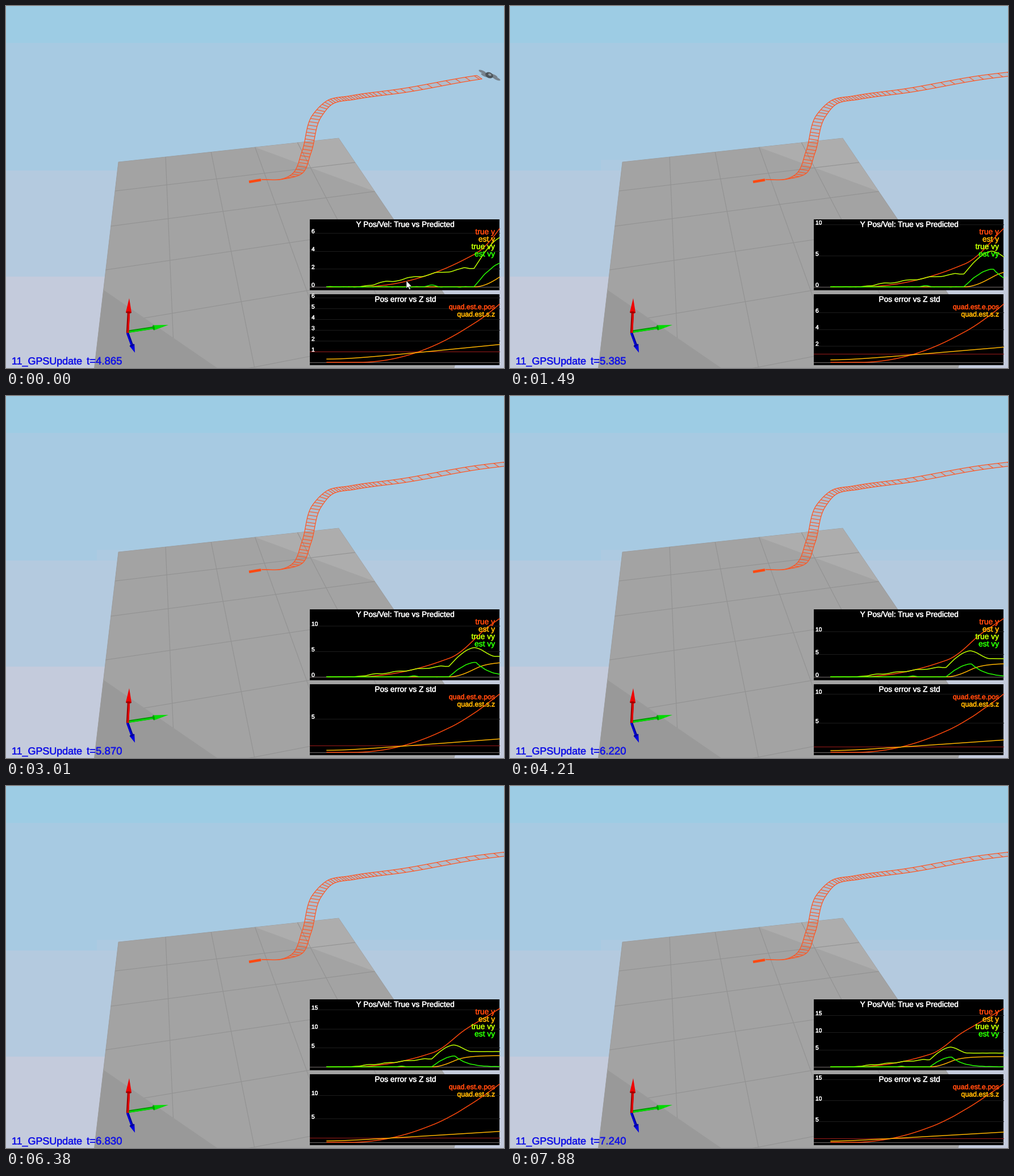
A matplotlib script that plays this animation: 877 px wide and 638 px high, repeating every 8 s.

```python
import numpy as np
import matplotlib.pyplot as plt
from matplotlib import patheffects
from matplotlib.animation import FuncAnimation
from matplotlib.collections import LineCollection
from matplotlib.patches import Ellipse, Polygon, Rectangle

W, H, DPI = 877, 638, 64
PX = 72 / DPI  # points per pixel
FRAMES, INTERVAL = 160, 50
STEPS = 59  # pictures in one loop

RED, GOLD = "#ff480c", "#ffb400"
LIME, GREEN = "#beff00", "#28ff00"
TRAIL, BLUE = "#ff5420", "#1414e6"

fig = plt.figure(figsize=(W / DPI, H / DPI), dpi=DPI)
ax = fig.add_axes([0, 0, 1, 1])
ax.set_xlim(0, W)
ax.set_ylim(H, 0)
ax.axis("off")


def ramp(x, a, b):
    return np.clip((x - a) / (b - a), 0, 1)


def smooth(x, a, b):
    s = ramp(x, a, b)
    return s * s * (3 - 2 * s)


def rect(x0, y0, x1, y1, color, z=0):
    return ax.add_patch(Rectangle((x0, y0), x1 - x0, y1 - y0, fc=color, lw=0, zorder=z))


def poly(points, color, z=1, **kw):
    return ax.add_patch(Polygon(points, closed=True, fc=color, zorder=z, **{"lw": 0, **kw}))


def line(xs, ys, color, width=1.0, z=2, **kw):
    return ax.plot(xs, ys, color=color, lw=width * PX, zorder=z, **kw)[0]


def segments(color, width, z, lines=()):
    return ax.add_collection(LineCollection(lines, colors=color, linewidths=width * PX, zorder=z))


def label(x, y, text, size, color="white", ha="left", z=12):
    bold = patheffects.withStroke(linewidth=0.45 * PX, foreground=color)
    return ax.text(x, y, text, fontsize=size * PX, color=color, ha=ha, va="baseline",
                   family="Liberation Sans", zorder=z, path_effects=[bold])


# ---------------------------------------------------------------- scene
def floor(u, v):
    """Perspective view of the 5 x 5 tiled floor."""
    depth = 1 + 0.018 * u - 0.0887 * v
    return (198 + 88.1 * u - 23 * v) / depth, (275 - 4.2 * u + 22.1 * v) / depth


def draw_scene():
    for top, color in zip((0, 65, 290, 477), ("#9dcce4", "#a7cae2", "#b4cadf", "#c4cbdc")):
        rect(0, top, W, H, color)
    poly([floor(0, 0), floor(5, 0), floor(5, 5), (789, H), floor(0, 4.61)], "#a3a3a3",
         ec="#9a9a9a", lw=0.8 * PX)
    poly([floor(3, 0), floor(5, 0), floor(5, 2)], "#adadad")
    for k in range(1, 6):
        segments("#929292", 1.1, 2, [[floor(0, k), floor(5, k)]])
        if k < 5:
            segments("#929292", 1.1, 2, [[floor(k, 0), floor(k, 5)]])
    poly([floor(0, 3.39), (372, H), floor(0, 4.61)], "#999999", 3)
    line([W - 0.5] * 2, [0, H], "#dfe6ea", 1, 20)


def arrow(base, neck, tip, color, dark, half=4.5):
    base, neck, tip = (np.array(p, float) for p in (base, neck, tip))
    d = (tip - neck) / np.hypot(*(tip - neck))
    n = np.array([-d[1], d[0]])
    line(*zip(base, neck), dark, 4.5, 5, solid_capstyle="butt")
    line(*zip(base + n, neck + n), color, 2.2, 5, solid_capstyle="butt")
    poly([neck + n * half, tip, neck - n * half], color, 6)
    ax.add_patch(Ellipse(neck, 3.5, 2 * half, angle=np.degrees(np.arctan2(d[1], d[0])),
                         fc=dark, lw=0, zorder=6))


draw_scene()
haze = rect(160, 271, W, 290, "#adcae1", 0.5)
arrow((214, 576), (222, 598), (227, 611), "#0000e0", "#00009c")
arrow((214, 574), (260, 567), (286, 562), "#00dc00", "#009a00")
arrow((214, 576), (216, 540), (217, 515), "#f00000", "#a00000", 5)


# ---------------------------------------------------------------- trail
def curve(points, n=600):
    """Smooth path through key points, evenly spaced along its chords."""
    p = np.array(points, float)
    s = np.append(0, np.cumsum(np.hypot(*np.diff(p, axis=0).T)))
    m = np.gradient(p, s, axis=0)
    q = np.linspace(0, s[-1], n)
    i = np.clip(np.searchsorted(s, q, side="right") - 1, 0, len(s) - 2)
    h = (s[i + 1] - s[i])[:, None]
    t = (q - s[i])[:, None] / h
    return ((1 + 2 * t) * (1 - t) ** 2 * p[i] + t * (1 - t) ** 2 * h * m[i]
            + t * t * (3 - 2 * t) * p[i + 1] + t * t * (t - 1) * h * m[i + 1])


PATH = curve([(450, 306), (487, 305), (513, 295), (529, 258), (548, 193), (570, 170),
              (610, 161.5), (700, 149), (834, 125.5), (905, 117)])


def half_width():
    x = PATH[:, :1]
    bend = smooth(x, 545, 575)
    side = (1 - bend) * np.array([8, 1.2]) + bend * np.array([4.6, 3.1])
    return side * (0.08 + 0.92 * smooth(x, 482, 522))


def rung_indices():
    """Rungs spread out as the flight gets faster."""
    length = np.append(0, np.cumsum(np.hypot(*np.diff(PATH, axis=0).T)))
    found, s = [], 36.0
    while s < length[-1]:
        i = int(np.searchsorted(length, s))
        found.append(i)
        s += 6.2 - 1.2 * smooth(PATH[i, 0], 550, 575) + 12 * smooth(PATH[i, 0], 610, 740)
    return np.array(found)


SIDE = half_width()
UPPER, LOWER = PATH - SIDE, PATH + SIDE
RUNGS = rung_indices()
DRONE_STEP = 9  # pixels per picture

line([428, 449], [310, 306.5], "#ff4a12", 4.5, 4, solid_capstyle="butt")
ribbon = poly(UPPER[:3], TRAIL, 3, alpha=0.1)
rails = segments(TRAIL, 1.2, 4)
rungs = segments(TRAIL, 1.1, 4)


def set_trail(step):
    n = int(np.searchsorted(PATH[:, 0], 834 + DRONE_STEP * step))
    rails.set_segments([UPPER[:n], LOWER[:n]])
    ribbon.set_xy(np.vstack([UPPER[:n], LOWER[:n][::-1]]))
    i = np.append(RUNGS[RUNGS < n], n - 1)
    rungs.set_segments(np.stack([UPPER[i], LOWER[i]], axis=1))


# ---------------------------------------------------------------- drone
def blob(dx, dy, w, h, color):
    part = Ellipse((0, 0), w, h, angle=24, fc=color, lw=0, zorder=7)
    return ax.add_patch(part), dx, dy


drone = [blob(0, 0, 32, 3, "#5c666e")]
drone += [blob(dx, dy, 14, 4.5, "#76828c")
          for dx, dy in ((-12, -6), (13, 6), (-8, 0), (8, 1))]
drone += [blob(0, 0, 14, 10, "#4a5359"), blob(1, -1, 6, 4, "#8b979f")]


def set_drone(step):
    x, y = 851 + DRONE_STEP * step, 122 - 1.1 * step
    for part, dx, dy in drone:
        part.set_center((x + dx, y + dy))
        part.set_visible(x < W + 24)


# ---------------------------------------------------------------- signals
T = np.linspace(0, 7.5, 1501)
KICK, PEAK = 4.15, 5.08  # start and top of the burst of speed


def integral(v):
    return np.append(0, np.cumsum((v[1:] + v[:-1]) / 2 * np.diff(T)))


def make_signals():
    burst = np.sin(np.pi / 2 * ramp(T, KICK, PEAK))
    jitter = 0.03 * np.sin(9 * T) * np.sin(4.3 * T + 1) + 0.02 * np.sin(23 * T)
    climb = np.clip(0.69 * (T - 0.9), 0, 2.05)
    vel = climb + 3.7 * burst - 1.75 * smooth(T, 5, 5.75)
    est_vel = 2.85 * burst * np.exp(-np.clip(T - PEAK, 0, None) / 0.45)
    pos, est_pos = integral(vel), integral(est_vel)
    waves = 0.09 * np.sin(2 * np.pi * (T - 1.42) / 0.74) * smooth(T, 0.8, 1.5) * (T < KICK - 0.14)
    bump = 0.2 * np.exp(-((T - 2.95) / 0.12) ** 2)
    return {
        "true y": pos, "est y": est_pos,
        "true vy": vel + waves + 0.5 * jitter, "est vy": est_vel + bump + jitter,
        "quad.est.e.pos": pos - est_pos, "quad.est.s.z": np.hypot(0.3, 0.335 * T),
    }


SIGNALS = make_signals()


class Chart:
    """Black panel whose axes rescale as the recording grows."""
    X0, X1, TICKS = 565, 869, 8

    def __init__(self, top, zero, title, names, colors, size, limit=False):
        self.top, self.zero, self.lead = top, zero, SIGNALS[names[0]]
        rect(535, top, 869, top + 125, "black", 10)
        label(703.5, top + 13.3, title, 13.7, ha="center")
        self.rule(zero, "#77706e", 10.6)
        self.grid = [self.rule(0, "#1c1c1c", 10.5) for _ in range(self.TICKS)]
        self.ticks = [label(538, 0, "", 10.2) for _ in range(self.TICKS)]
        self.limit = self.rule(0, "#9c1a1a", 10.7) if limit else None
        self.curves = []
        for k, (name, color) in enumerate(zip(names, colors)):
            self.curves.append((SIGNALS[name], line([], [], color, 1.5, 11)))
            label(861, top + 26.3 + 13 * k, name, size, color, "right")

    @staticmethod
    def rule(y, color, z):
        return line([535, 869], [y, y], color, 1, z)

    def update(self, now):
        t = np.linspace(0, now, 300)
        peak = np.interp(now, T, self.lead)
        scale = 102.5 / peak
        for signal, plot in self.curves:
            plot.set_data(self.X0 + (self.X1 - self.X0) * t / now,
                          self.zero - scale * np.interp(t, T, signal))
        if self.limit:
            self.limit.set_ydata([self.zero - scale] * 2)
        gap = 1 if peak < 5.8 else 2 if peak < 8.2 else 5
        for k, (grid, tick) in enumerate(zip(self.grid, self.ticks)):
            y = self.zero - scale * gap * k
            inside = y >= self.top + 6
            grid.set_ydata([y, y])
            grid.set_visible(inside and k > 0)
            tick.set_text(str(gap * k))
            tick.set_y(y)
            tick.set_visible(inside and (k > 0 or (not self.limit and now < 6.4)))


charts = [
    Chart(376, 495, "Y Pos/Vel: True vs Predicted",
          ("true y", "est y", "true vy", "est vy"), (RED, GOLD, LIME, GREEN), 13.8),
    Chart(508, 628, "Pos error vs Z std",
          ("quad.est.e.pos", "quad.est.s.z"), (RED, GOLD), 12.4, limit=True),
]

cursor = poly([(705, 484), (705, 498), (708, 495), (710.5, 500), (712.5, 499),
               (710.3, 494.3), (714.5, 494)], "white", 14, ec="black", lw=0.6 * PX)

label(10, 631.7, "11_GPSUpdate", 17.9, BLUE)
clock = label(142, 631.7, "", 18.6, BLUE)


# ---------------------------------------------------------------- timing
def clock_time(step):
    """Recorded seconds; playback slows down slightly along the way."""
    now = np.interp(step, [0, 11, 22, 31, 39, 47, 58],
                    [4.865, 5.385, 5.87, 6.22, 6.53, 6.83, 7.24])
    return round(now * 200) / 200


def update(frame):
    ms = frame * INTERVAL + 40
    step = int(ms * STEPS / (FRAMES * INTERVAL) + 0.05)
    now = clock_time(step)
    set_trail(step)
    set_drone(step)
    for chart in charts:
        chart.update(now)
    clock.set_text(f"t={now:.3f}")
    cursor.set_visible(step < 3)
    haze.set_visible(step > 0)
    return []


anim = FuncAnimation(fig, update, frames=FRAMES, interval=INTERVAL,
                     init_func=lambda: update(0), repeat=True, repeat_delay=0)
plt.show()
```
